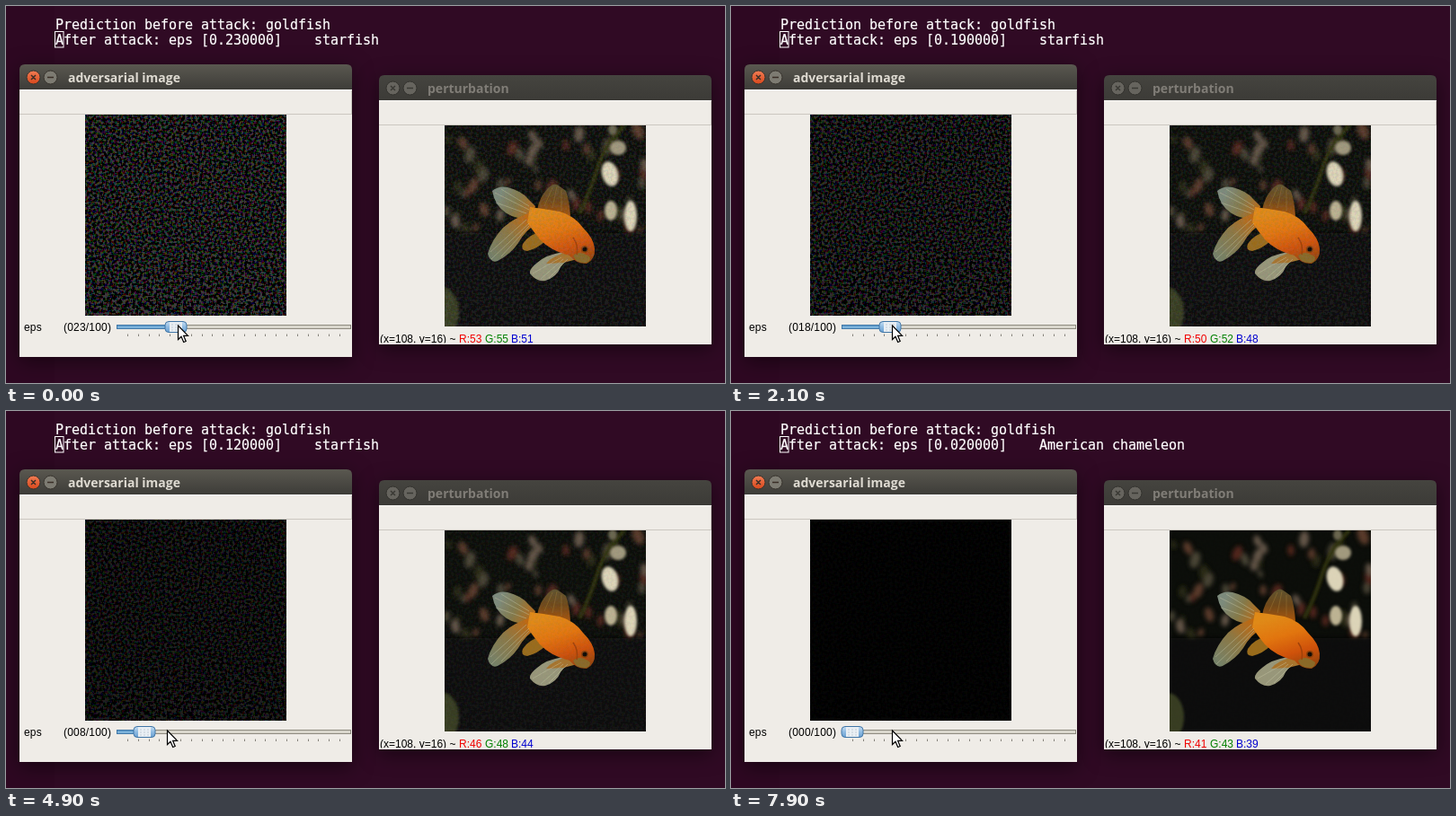
An HTML page with a canvas for the animation above (8 s loop, 800 px wide and 420 px high).

```html
<!DOCTYPE html>
<html lang="en">
<head>
<meta charset="utf-8">
<title>Adversarial image demo</title>
<style>
  html, body { margin: 0; width: 100%; height: 100%; overflow: hidden; background: #300a24; }
  #stage { position: relative; width: 800px; height: 420px; overflow: hidden; }
  svg { position: absolute; left: 0; top: 0; }
  canvas { position: absolute; width: 224px; height: 224px; }
  #noise { left: 88px; top: 121px; }
  #grain { left: 488px; top: 133px; mix-blend-mode: difference; }
  .term { font: 15px "DejaVu Sans Mono", monospace; letter-spacing: -.03px; fill: #fff; stroke: #fff; stroke-width: .2px; white-space: pre; }
  .title { font: 700 14px "Open Sans", sans-serif; }
  .ui { font: 12px "Liberation Sans", Arial, sans-serif; fill: #000; white-space: pre; }
  .wide { letter-spacing: .19px; }
  .shadow { filter: drop-shadow(0 5px 11px rgba(0, 0, 0, .5)); }
</style>
</head>
<body>
<div id="stage">
<svg width="800" height="420" viewBox="0 0 800 420">
  <defs>
    <linearGradient id="bar" x2="0" y2="1">
      <stop offset="0" stop-color="#5a5850"/><stop offset="1" stop-color="#3d3c38"/>
    </linearGradient>
    <linearGradient id="barOff" x2="0" y2="1">
      <stop offset="0" stop-color="#45443f"/><stop offset="1" stop-color="#3c3b37"/>
    </linearGradient>
    <linearGradient id="close" x2="0" y2="1">
      <stop offset="0" stop-color="#f07c54"/><stop offset="1" stop-color="#d9481c"/>
    </linearGradient>
    <linearGradient id="knob" x2="0" y2="1">
      <stop offset="0" stop-color="#c6def2"/><stop offset=".5" stop-color="#8fbbe2"/><stop offset="1" stop-color="#6a9fd0"/>
    </linearGradient>
    <linearGradient id="fill" x2="0" y2="1">
      <stop offset="0" stop-color="#5a98c8"/><stop offset="1" stop-color="#8fc0e4"/>
    </linearGradient>
    <linearGradient id="skin" gradientUnits="userSpaceOnUse" x1="122" y1="95" x2="140" y2="156">
      <stop offset="0" stop-color="#e08a18"/><stop offset=".35" stop-color="#e2760f"/>
      <stop offset=".7" stop-color="#cf520b"/><stop offset="1" stop-color="#94440d"/>
    </linearGradient>
    <linearGradient id="tail" gradientUnits="userSpaceOnUse" x1="58" y1="84" x2="100" y2="104">
      <stop offset="0" stop-color="#7d8b7c"/><stop offset=".45" stop-color="#857a4a"/><stop offset="1" stop-color="#c4680d"/>
    </linearGradient>
    <linearGradient id="tailLow" gradientUnits="userSpaceOnUse" x1="52" y1="146" x2="97" y2="103">
      <stop offset="0" stop-color="#768269"/><stop offset=".5" stop-color="#8c7845"/><stop offset="1" stop-color="#c4680d"/>
    </linearGradient>
    <linearGradient id="dorsal" x2="0" y2="1">
      <stop offset="0" stop-color="#5f5430"/><stop offset=".5" stop-color="#70491a"/><stop offset="1" stop-color="#a9560d"/>
    </linearGradient>
    <filter id="soft" x="-30%" y="-30%" width="160%" height="160%"><feGaussianBlur stdDeviation="1.8"/></filter>
    <filter id="haze" x="-30%" y="-30%" width="160%" height="160%"><feGaussianBlur stdDeviation="2.6"/></filter>
    <filter id="edge"><feGaussianBlur stdDeviation=".6"/></filter>
    <clipPath id="photoBox"><rect width="224" height="224"/></clipPath>
    <clipPath id="statusBox"><rect x="415" y="360" width="370" height="15.6"/></clipPath>
    <path id="cap" d="M0 28V6Q0 0 6 0H364Q370 0 370 6V28Z"/>
  </defs>

  <rect width="800" height="420" fill="#300a24"/>
  <rect width="54" height="420" fill="#2e0822"/>
  <g class="term">
    <text x="55" y="26">Prediction before attack: goldfish</text>
    <text x="55" y="43" id="attack"></text>
    <text x="343" y="43" id="label"></text>
  </g>
  <rect x="54.5" y="28.5" width="9.5" height="17.5" fill="none" stroke="#fff"/>

  <!-- inactive window -->
  <g class="shadow">
    <use href="#cap" x="415" y="77" fill="url(#barOff)"/>
    <rect x="415" y="105" width="370" height="272" fill="#efece7"/>
  </g>
  <path d="M415 132.5H785M784.5 105V132" stroke="#cbc7c0"/>
  <path d="M415 105.5H785" stroke="#faf9f7"/>
  <g fill="#66645e" stroke="#33322e">
    <circle cx="430.5" cy="91.5" r="7.5"/><circle cx="449.5" cy="91.5" r="7.5"/>
  </g>
  <path d="M428 89l5 5m0-5l-5 5M446 91.5h7" stroke="#3a3934" stroke-width="1.5"/>
  <text class="title" x="469" y="97" fill="#807d77">perturbation</text>

  <!-- photo -->
  <g transform="translate(488 133)" clip-path="url(#photoBox)">
    <rect width="224" height="224" fill="#0c0e0a"/>
    <g id="blobs" filter="url(#haze)"></g>
    <path d="M200 0Q178 22 170 48T150 98" fill="none" stroke="#30340f" stroke-width="4" filter="url(#soft)"/>
    <rect x="-10" y="120" width="244" height="120" fill="#080b07" filter="url(#haze)"/>
    <g fill="#dcd4b8" filter="url(#soft)">
      <ellipse cx="184" cy="54" rx="9" ry="14" transform="rotate(-15 184 54)"/>
      <ellipse cx="193" cy="25" rx="9" ry="8" fill="#a29a7e"/>
      <ellipse cx="207" cy="101" rx="7" ry="17"/>
      <ellipse cx="185" cy="95" rx="7" ry="11" fill="#bdb393"/>
      <ellipse cx="187" cy="5" rx="5" ry="6" fill="#6a6650"/>
    </g>
    <ellipse cx="-2" cy="208" rx="18" ry="27" fill="#383d24" filter="url(#soft)"/>
    <g filter="url(#edge)">
      <path d="M53 73Q60 67 70 69Q86 73 93 82L101 90L97 103Q82 106 69 98Q56 90 53 73Z" fill="url(#tail)"/>
      <path d="M98 97Q78 102 65 114Q52 128 48 143Q51 154 59 151Q74 143 82 131Q90 116 103 110Z" fill="url(#tailLow)"/>
      <path d="M103 95Q105 80 115 70Q121 64 125 66Q130 69 135 73Q139 84 140 101Z" fill="url(#dorsal)"/>
      <path d="M107 119Q94 121 87 132Q84 139 92 140Q104 137 113 128Z" fill="#9a6c1c"/>
      <path d="M132 141Q113 144 103 153Q94 160 95 165Q103 175 112 173Q125 169 129 158Q134 149 146 149Z" fill="#98977a"/>
      <path d="M137 141Q120 145 113 154L132 153L148 149Z" fill="#a8752e"/>
      <path d="M95 91Q112 93 128 96Q145 101 154 114Q166 126 167 137Q168 149 158 154Q146 154 139 145Q118 140 106 127Q97 116 92 108Z" fill="url(#skin)"/>
      <path d="M143 145Q150 138 162 147Q162 154 154 153Q146 153 143 145Z" fill="#8a6a28"/>
      <path d="M143 125Q149 133 147 144" fill="none" stroke="#a0420a" stroke-width="1.5"/>
      <circle cx="156" cy="138" r="4" fill="#8c400b"/><circle cx="156" cy="138" r="2.5" fill="#120d07"/>
      <g fill="none" stroke="#c6c6a4" stroke-width=".9" opacity=".5">
        <path d="M56 75L94 94M63 71L94 90M57 86L91 98M51 141L91 105M52 149L94 109M63 146L94 112M98 165L130 147M107 171L132 149M116 170L137 149"/>
        <path d="M111 90L120 69M120 92L125 68M130 95L130 72" stroke="#a07c38"/>
      </g>
    </g>
  </g>

  <g class="ui" clip-path="url(#statusBox)">
    <text x="416" y="375">(x=108, y=16) ~</text>
    <text x="504" y="375" fill="#f00000" id="red"></text>
    <text x="533" y="375" fill="#008000" id="green"></text>
    <text x="562" y="375" fill="#0000d0" id="blue"></text>
  </g>

  <!-- active window -->
  <g class="shadow">
    <use href="#cap" x="15" y="65" fill="url(#bar)"/>
    <rect x="15" y="93" width="370" height="298" fill="#efece7"/>
  </g>
  <path d="M15 120.5H385M384.5 93V120" stroke="#cbc7c0"/>
  <path d="M15 93.5H385" stroke="#faf9f7"/>
  <circle cx="30.5" cy="79.5" r="7.5" fill="url(#close)" stroke="#37332d"/>
  <circle cx="49.5" cy="79.5" r="7.5" fill="#7d7b72" stroke="#37332d"/>
  <path d="M28 77l5 5m0-5l-5 5M46 79.5h7" stroke="#3a2e27" stroke-width="1.5"/>
  <text class="title" x="69" y="85" fill="#dfdbd2">adversarial image</text>
  <rect x="88" y="121" width="224" height="224"/>

  <g class="ui wide">
    <text x="20" y="362">eps</text>
    <text x="64" y="362" id="count"></text>
  </g>
  <rect x="123.5" y="355.5" width="260" height="4" fill="#d9d6cc" stroke="#8d897e"/>
  <rect x="123.5" y="355.5" height="4" id="done" fill="url(#fill)" stroke="#3f76a6"/>
  <path id="ticks" stroke="#85827b"/>
  <g id="thumb">
    <rect x="-12" y="351.5" width="24" height="12" rx="4" fill="url(#knob)" stroke="#3f74a5"/>
    <rect x="-7" y="352" width="14" height="11" fill="#e9eff4"/>
    <path d="M-4.5 355h10M-4.5 358h10M-4.5 361h10" stroke="#98a8b6" stroke-dasharray="1 3"/>
  </g>
  <path id="mouse" d="M.5 .5V16L4 12.7L6.7 19L9.2 18L6.6 11.8H11.5Z" fill="#fff" stroke="#000" stroke-width="1.2"/>
</svg>
<canvas id="noise" width="224" height="224"></canvas>
<canvas id="grain" width="224" height="224"></canvas>
</div>
<script>
const $ = id => document.getElementById(id);
const LOOP = 8000, SIZE = 224;

// [time, value] steps
const slider = [[0, 23], [400, 22], [700, 21], [1100, 20], [1600, 19], [2000, 18], [3300, 17],
  [3500, 16], [3700, 15], [3900, 14], [4000, 13], [4100, 12], [4300, 11], [4500, 10], [4700, 9],
  [4900, 8], [5100, 7], [5200, 6], [5300, 5], [5500, 4], [5600, 3], [5800, 2], [7700, 1], [7900, 0]];
const epsilon = [[0, 23], [900, 22], [1400, 21], [1500, 20], [2100, 19], [2700, 18], [3800, 16],
  [4300, 15], [4400, 12], [5200, 10], [5500, 8], [5700, 5], [6200, 2]];
const shown = [[0, 23], [1300, 22], [1400, 21], [1600, 20], [2100, 18], [3900, 16],
  [4300, 15], [4500, 12], [5300, 10], [5500, 8], [5800, 5], [6300, 2]];
const pointer = [[0, 191], [300, 190], [400, 189], [500, 188], [700, 187], [900, 186], [1100, 184],
  [1300, 183], [1400, 182], [1500, 181], [1600, 180], [1900, 179]];

const at = (steps, t) => steps.filter(s => s[0] <= t).pop()[1];

let seed = 7;
function rand() {
  seed = (Math.imul(seed, 1664525) + 1013904223) >>> 0;
  return seed / 4294967296;
}

function blur(src, r) {
  const pass = (a, dx, dy) => a.map((_, i) => {
    const x = i % SIZE, y = (i - x) / SIZE;
    let sum = 0;
    for (let k = -r; k <= r; k++) {
      sum += a[(y + dy * k + SIZE) % SIZE * SIZE + (x + dx * k + SIZE) % SIZE];
    }
    return sum / (2 * r + 1);
  });
  return pass(pass(src, 1, 0), 0, 1);
}

// Band-passed noise gives short, winding strokes
function strokes(r) {
  const base = new Float32Array(SIZE * SIZE).map(() => rand() - .5);
  const fine = blur(base, r), wide = blur(fine, r + 1);
  return fine.map((v, i) => (v - wide[i]) * 14 * r);
}

function paintNoise() {
  const ctx = $('noise').getContext('2d');
  const img = ctx.createImageData(SIZE, SIZE);
  const common = strokes(1), coarse = strokes(2);
  for (let c = 0; c < 3; c++) {
    const own = strokes(1);
    common.forEach((v, i) => {
      // grey, larger patches towards the bottom
      const low = Math.max(0, i / SIZE / SIZE - .55) * 1.8;
      const sum = v * .8 + own[i] * .8 + coarse[i] * low;
      img.data[i * 4 + c] = sum * 600;
      img.data[i * 4 + 3] = 255;
    });
  }
  ctx.putImageData(img, 0, 0);
  $('grain').getContext('2d').drawImage($('noise'), 0, 0);
}

function paintBlobs() {
  const tones = ['#5a3a2c', '#4a4436', '#655648', '#2a2b16', '#52261c'];
  let out = '';
  for (let i = 0; i < 50; i++) {
    const x = rand() * 224, y = 6 + rand() * 112, r = 2.5 + rand() * 3.5;
    out += `<ellipse cx="${x}" cy="${y}" rx="${r}" ry="${r * 1.7}" fill="${tones[i % 5]}" transform="rotate(${rand() * 50 - 25} ${x} ${y})"/>`;
  }
  $('blobs').innerHTML = out;
}

function paintTicks() {
  let d = '';
  for (let i = 0; i <= 20; i++) d += `M${Math.round(135 + i * 11.8) + .5} 365.5v2.5`;
  $('ticks').setAttribute('d', d);
}

function draw(t) {
  const v = at(slider, t), e = at(epsilon, t) / 100, x = 135 + v * 2.36;
  const level = base => Math.floor(base + 56.9 * e);
  $('attack').textContent = `After attack: eps [${e.toFixed(6)}]`;
  $('label').textContent = t < 5700 ? 'starfish' : 'American chameleon';
  $('count').textContent = `(${String(v).padStart(3, '0')}/100)`;
  $('red').textContent = 'R:' + level(40.1);
  $('green').textContent = 'G:' + level(42);
  $('blue').textContent = 'B:' + level(38.1);
  $('done').setAttribute('width', x - 123.5);
  $('thumb').setAttribute('transform', `translate(${Math.round(x)} 0)`);
  $('mouse').setAttribute('transform', `translate(${at(pointer, t)} 355.5)`);
  $('noise').style.opacity = at(shown, t) / 100;
  $('grain').style.opacity = e * .35;
}

function tick() {
  draw(performance.now() % LOOP);
  requestAnimationFrame(tick);
}

paintNoise();
paintBlobs();
paintTicks();
tick();
</script>
</body>
</html>
```
